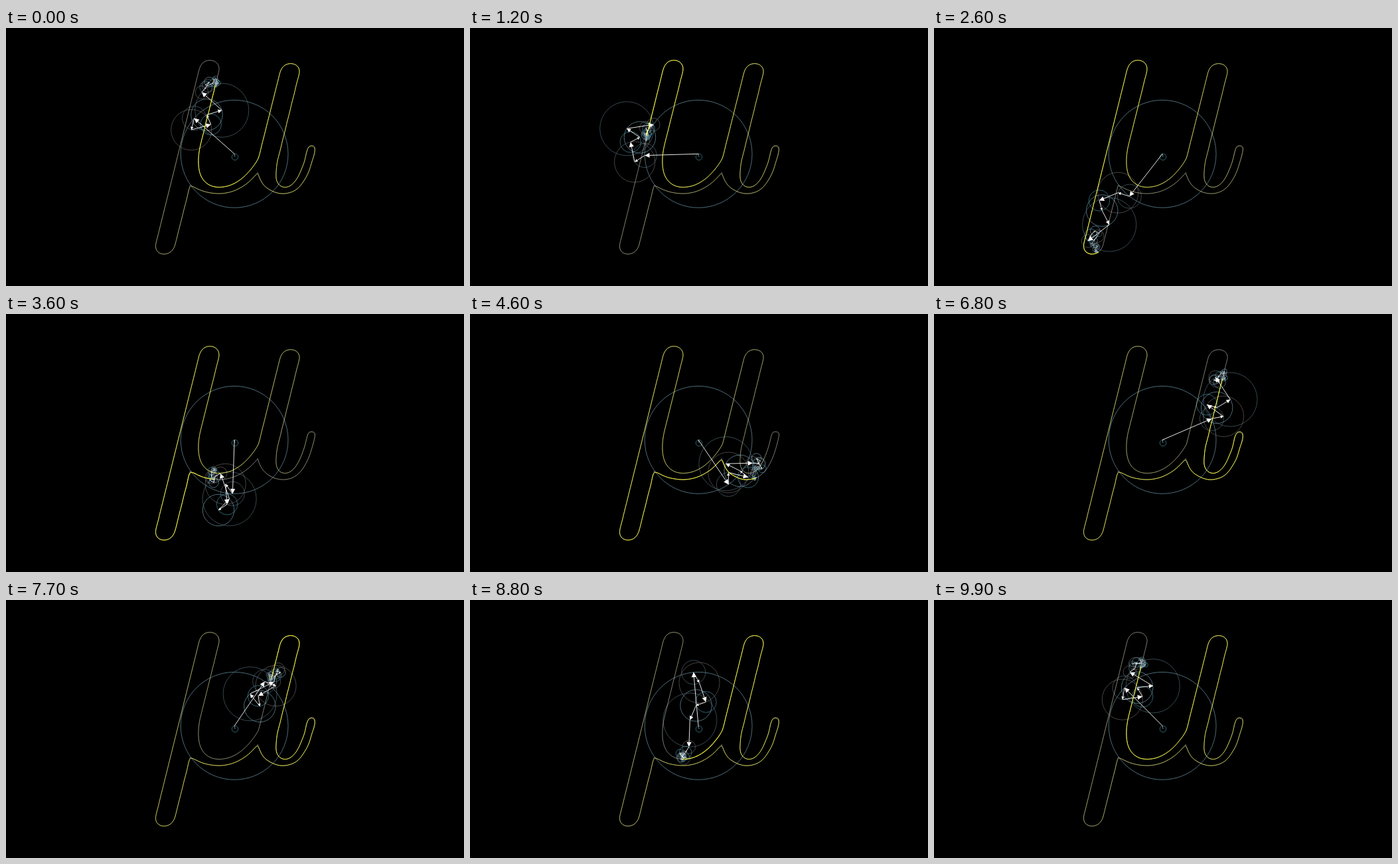
These frames come from a looping animation (690 px wide and 388 px high, 10000 ms). An HTML page with a canvas:

```html
<!DOCTYPE html>
<html lang="en">
<head>
<meta charset="utf-8">
<title>Epicycles drawing a mu</title>
<style>
html, body { margin: 0; width: 100%; height: 100%; overflow: hidden; background: #000; }
canvas { display: block; }
</style>
</head>
<body>
<canvas id="stage" width="690" height="388"></canvas>
<script>
const LOOP = 10000, STEP = 100;
const CENTER = { x: 345, y: 194 };
const SHIFT = 0.4; // outline coordinates to pixel centers
const SAMPLES = 1500, TRAIL = 600, MAX_FREQ = 50;
const COLORS = ['#4d9fb8', '#7fb3c6', '#5c7683', '#7a706c'];

const OUTLINE = `M314.9 86.2 L320.2 64.6
  C322.5 54 315 48.2 306.5 48.2 C298 48.2 292 54 289.6 66
  L225.4 324 C223.5 333 229 339.6 237 339.6 C245 339.6 251 335 254 327
  L277 236 C291 244 305 248.6 320 248.6 C342 248.6 362 238 379 217
  C383 236 398 248.6 418 248.6 C443 248.6 457 222 465 183
  C466 178 463 176.6 460 176.6 C456.5 176.6 455 178 453.8 182
  C447 212 436 239 420 239 C411 239 406.5 232 406.5 221
  C406.5 213 407.3 205 409 198 L441.3 68
  C443.5 59 437 53.3 428.5 53.3 C420 53.3 414.5 58 412 68
  L380 195.5 C364 223 343 239 321 239 C300 239 289.5 224 289.5 201
  C289.5 193 290.5 184 292.2 177 Z`;

const ctx = document.getElementById('stage').getContext('2d');

// Points at even arc length
function sampleOutline() {
  const path = document.createElementNS('http://www.w3.org/2000/svg', 'path');
  path.setAttribute('d', OUTLINE);
  const length = path.getTotalLength();
  return Array.from({ length: SAMPLES }, (_, i) => {
    const p = path.getPointAtLength(length * i / SAMPLES);
    return { x: p.x + SHIFT, y: p.y + SHIFT };
  });
}

// Fourier term of the points relative to the center, y upwards
function coefficient(points, freq) {
  let re = 0, im = 0;
  points.forEach((p, i) => {
    const a = -2 * Math.PI * freq * i / SAMPLES;
    const x = p.x - CENTER.x, y = CENTER.y - p.y;
    re += x * Math.cos(a) - y * Math.sin(a);
    im += x * Math.sin(a) + y * Math.cos(a);
  });
  return { freq, radius: Math.hypot(re, im) / SAMPLES, phase: Math.atan2(im, re) };
}

const points = sampleOutline();
const outline = new Path2D();
points.forEach(p => outline.lineTo(p.x, p.y));
outline.closePath();

const freqs = [0];
for (let k = 1; k <= MAX_FREQ; k++) freqs.push(k, -k);
const terms = freqs.map(f => coefficient(points, f));

// Joints of the vector chain at phase s (0 to 1)
function chain(s) {
  const joints = [{ ...CENTER }];
  let { x, y } = CENTER;
  for (const { freq, radius, phase } of terms) {
    const a = phase + 2 * Math.PI * freq * s;
    x += radius * Math.cos(a);
    y -= radius * Math.sin(a);
    joints.push({ x, y });
  }
  return joints;
}

const trail = Array.from({ length: TRAIL }, (_, i) => chain(i / TRAIL).pop());

function line(a, b, width) {
  ctx.lineWidth = width;
  ctx.beginPath();
  ctx.moveTo(a.x, a.y);
  ctx.lineTo(b.x, b.y);
  ctx.stroke();
}

function arrow(a, b, length) {
  if (length < 0.05) return;
  const ux = (b.x - a.x) / length, uy = (b.y - a.y) / length;
  const tip = Math.min(7.3, length * 0.25), half = tip / 2;
  const base = { x: b.x - ux * tip, y: b.y - uy * tip };
  line(a, base, Math.min(0.9, length * 0.1));
  ctx.beginPath();
  ctx.moveTo(b.x, b.y);
  ctx.lineTo(base.x - uy * half, base.y + ux * half);
  ctx.lineTo(base.x + uy * half, base.y - ux * half);
  ctx.fill();
}

function drawCircles(joints) {
  terms.forEach(({ radius }, i) => {
    ctx.strokeStyle = COLORS[i % COLORS.length];
    ctx.lineWidth = 0.6;
    ctx.beginPath();
    ctx.arc(joints[i].x, joints[i].y, radius, 0, 2 * Math.PI);
    ctx.stroke();
  });
}

function drawVectors(joints) {
  ctx.strokeStyle = ctx.fillStyle = '#fff';
  terms.forEach(({ radius }, i) => arrow(joints[i], joints[i + 1], radius));
}

function drawTrail(s) {
  const head = Math.round(s * TRAIL) + TRAIL;
  ctx.strokeStyle = '#ffff30';
  for (let age = TRAIL - 1; age >= 0; age--) {
    const a = trail[(head - age) % TRAIL];
    const b = trail[(head - age - 1) % TRAIL];
    line(a, b, 1.05 * (1 - age / TRAIL));
  }
}

function draw(s) {
  ctx.fillStyle = '#000';
  ctx.fillRect(0, 0, 690, 388);
  const joints = chain(s);
  drawCircles(joints);
  ctx.strokeStyle = '#fff';
  ctx.lineWidth = 0.48;
  ctx.stroke(outline);
  drawVectors(joints);
  drawTrail(s);
}

let shown = -1;
function tick() {
  const step = Math.floor(performance.now() % LOOP / STEP);
  if (step !== shown) draw(step * STEP / LOOP);
  shown = step;
  requestAnimationFrame(tick);
}
tick();
</script>
</body>
</html>
```
